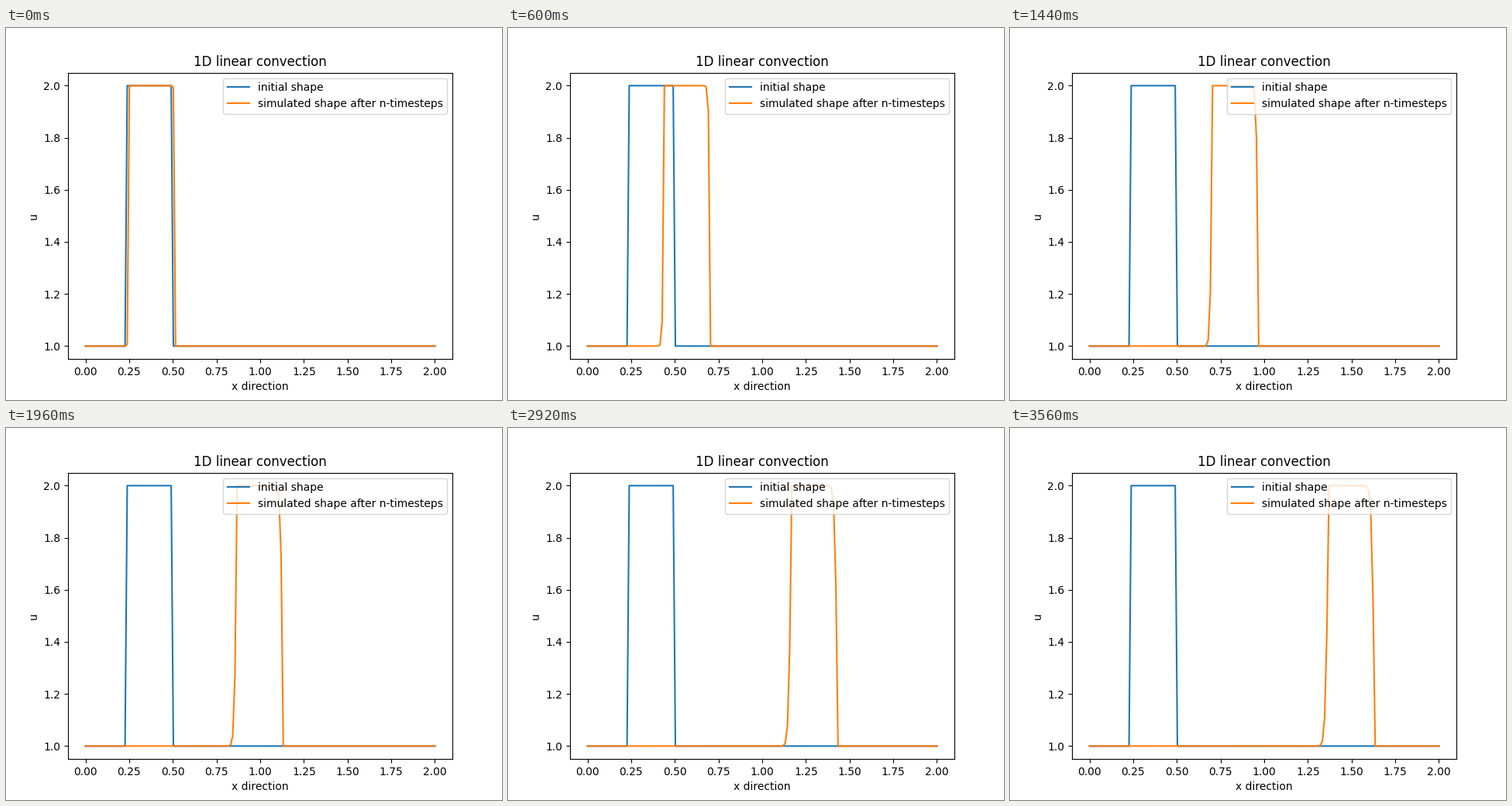
Write a matplotlib script that moves like this. It is 640 px wide and 480 px high and loops after 3.6 s.

```python
import numpy as np
import matplotlib.pyplot as plt
from matplotlib.animation import FuncAnimation

FRAMES, INTERVAL = 90, 40
NX, LENGTH = 160, 2.0
SPEED, DT = 1.0, 0.0125

dx = LENGTH / (NX - 1)
x = np.linspace(0, LENGTH, NX)


def square_pulse():
    u = np.ones(NX)
    u[int(0.25 / dx):int(0.5 / dx + 1)] = 2
    return u


def convect(u, steps):
    """First-order upwind scheme."""
    u = u.copy()
    for _ in range(steps):
        u[1:] -= SPEED * DT / dx * np.diff(u)
    return u


start = square_pulse()

fig, ax = plt.subplots(figsize=(6.4, 4.8), dpi=100)
ax.plot(x, start, label="initial shape")
wave, = ax.plot(x, convect(start, 1), label="simulated shape after n-timesteps")
ax.set_title("1D linear convection")
ax.set_xlabel("x direction")
ax.set_ylabel("u")
ax.set_xlim(-0.1, 2.1)
ax.set_ylim(0.95, 2.05)
ax.legend(loc="upper right")


def update(frame):
    wave.set_ydata(convect(start, frame + 1))
    return wave,


anim = FuncAnimation(fig, update, frames=FRAMES, interval=INTERVAL,
                     repeat=True, repeat_delay=0)
plt.show()
```
